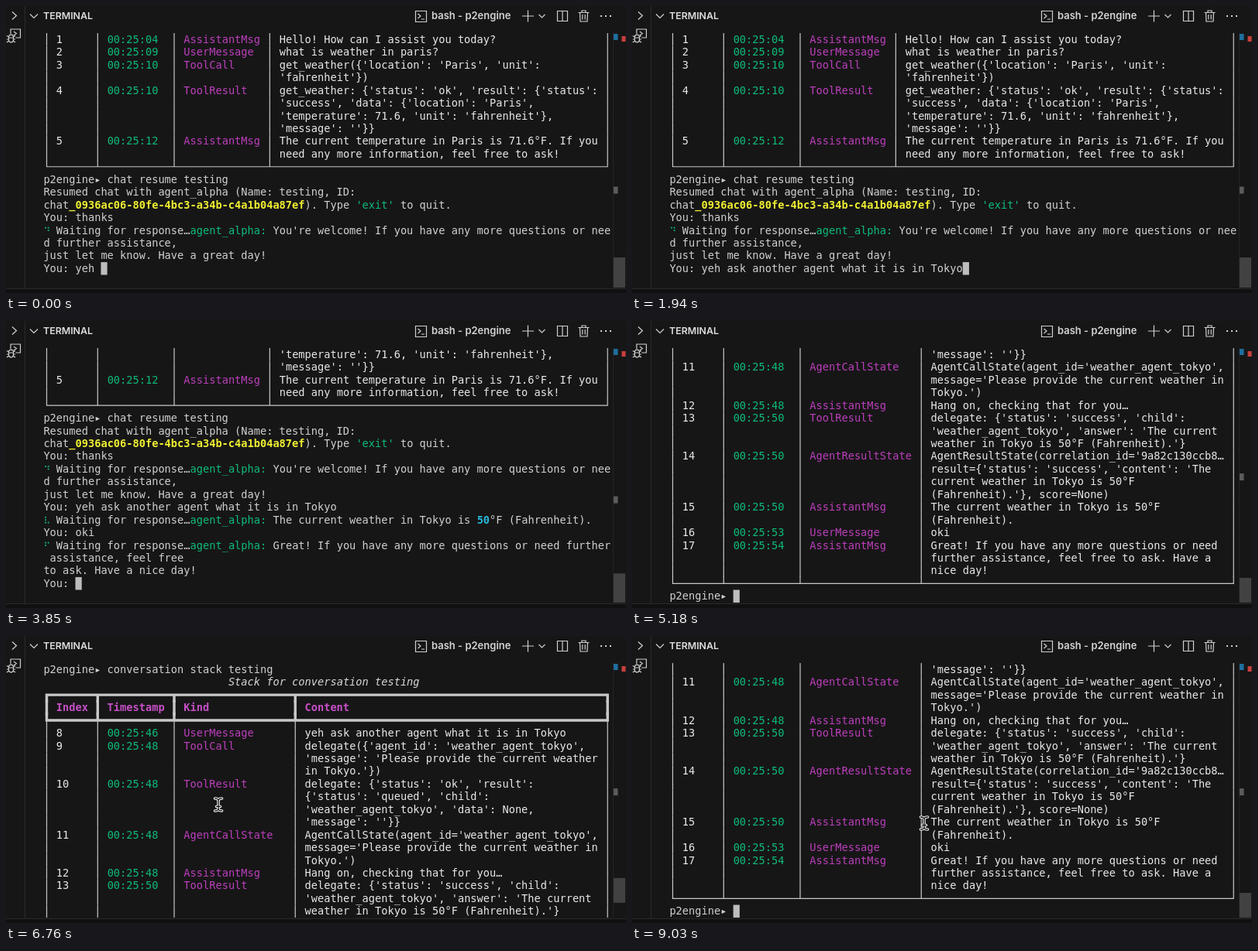
An HTML page with a canvas that plays this animation: 800 px wide and 371 px high, repeating every 9.06 s.

```html
<!DOCTYPE html>
<html lang="en">
<head>
<meta charset="utf-8">
<title>Terminal</title>
<style>
html, body { margin: 0; width: 100%; height: 100%; overflow: hidden; background: #171617; }
canvas { display: block; }
</style>
</head>
<body>
<canvas id="stage" width="800" height="371"></canvas>
<script>
const g = document.getElementById('stage').getContext('2d');
const LOOP = 9060, X0 = 48.4, TOP = 35, CW = 8.224, LH = 16.45, ROWS = 20, HISTORY = 149;
const MONO = '"DejaVu Sans Mono", monospace', SANS = 'Inter, "Open Sans", sans-serif';
const COLORS = { d: '#d0d0d0', w: '#e8e8e8', g: '#0dbc79', m: '#bc3fbc', y: '#f0f032', c: '#29b8db', h: '#c650c6', i: '#d8d8d8' };
const STYLES = { y: 'bold ', c: 'bold ', h: 'bold ', i: 'italic ' };
const SPIN = [[1, 2, 4], [1, 4, 5], [4, 5, 6], [3, 4, 5, 6], [3, 5, 6], [2, 3, 6], [1, 2, 3, 6], [1, 2, 3], [1, 2, 3, 4]];

// A tilde plus a letter switches the colour inside a line.
const PROMPT = 'p2engine▸ ';
const WAIT = '  Waiting for response…', AGENT = WAIT + '~gagent_alpha:~d ';
const BARS1 = [0, 8, 20, 35, 88], BARS2 = [0, 8, 20, 39, 88];
const text = (s, extra) => ({ s, ...extra });
const entry = (bars, id, time, kind, ...body) => body.map((b, i) => ({
  bars, s: i ? ' '.repeat(bars[3] + 2) + '~w' + b
    : '~w' + ('  ' + id).padEnd(10) + '~g00:25:' + time + '    ~m' + kind.padEnd(bars[3] - 20) + '~w' + b
}));
const first = (...a) => entry(BARS1, ...a), second = (...a) => entry(BARS2, ...a);

const intro = [
  ...first(1, '04', 'AssistantMsg', 'Hello! How can I assist you today?'),
  ...first(2, '09', 'UserMessage', 'what is weather in paris?'),
  ...first(3, '10', 'ToolCall', "get_weather({'location': 'Paris', 'unit':", "'fahrenheit'})"),
  ...first(4, '10', 'ToolResult', "get_weather: {'status': 'ok', 'result': {'status':",
    "'success', 'data': {'location': 'Paris',", "'temperature': 71.6, 'unit': 'fahrenheit'},", "'message': ''}}"),
  ...first(5, '12', 'AssistantMsg', 'The current temperature in Paris is 71.6°F. If you',
    'need any more information, feel free to ask!'),
  text('', { bars: BARS1, rule: 'end' }),
  text(PROMPT + 'chat resume testing'),
  text('Resumed chat with agent_alpha (Name: testing, ID:'),
  text("chat~y_0936ac06-80fe-4bc3-a34b-c4a1b04a87ef~d). Type ~g'exit'~d to quit."),
  text('You: thanks'),
  text(AGENT + "You're welcome! If you have any more questions or nee", { spin: 1 }),
  text('d further assistance,'),
  text('just let me know. Have a great day!')
];
const tokyo = [text(AGENT + 'The current weather in Tokyo is ~c50~d°F (Fahrenheit).', { spin: 6 })];
const great = [
  text(AGENT + 'Great! If you have any more questions or need further', { spin: 0 }),
  text(' assistance, feel free'),
  text('to ask. Have a nice day!')
];
const stack = [
  text(' '.repeat(29) + '~iStack for conversation testing'),
  text('', { bars: BARS2, rule: 'top' }),
  text('  ~hIndex   Timestamp   ' + 'Kind'.padEnd(19) + 'Content', { bars: BARS2, rule: 'head' }),
  text('', { bars: BARS2, rule: 'mid' }),
  ...second(8, '46', 'UserMessage', 'yeh ask another agent what it is in Tokyo'),
  ...second(9, '48', 'ToolCall', "delegate({'agent_id': 'weather_agent_tokyo',",
    "'message': 'Please provide the current weather", "in Tokyo.'})"),
  ...second(10, '48', 'ToolResult', "delegate: {'status': 'ok', 'result':", "{'status': 'queued', 'child':",
    "'weather_agent_tokyo', 'data': None,", "'message': ''}}"),
  ...second(11, '48', 'AgentCallState', "AgentCallState(agent_id='weather_agent_tokyo',",
    "message='Please provide the current weather in", "Tokyo.')"),
  ...second(12, '48', 'AssistantMsg', 'Hang on, checking that for you…'),
  ...second(13, '50', 'ToolResult', "delegate: {'status': 'success', 'child':",
    "'weather_agent_tokyo', 'answer': 'The current", "weather in Tokyo is 50°F (Fahrenheit).'}"),
  ...second(14, '50', 'AgentResultState', "AgentResultState(correlation_id='9a82c130ccb8…",
    "result={'status': 'success', 'content': 'The", 'current weather in Tokyo is 50°F', "(Fahrenheit).'}, score=None)"),
  ...second(15, '50', 'AssistantMsg', 'The current weather in Tokyo is 50°F', '(Fahrenheit).'),
  ...second(16, '53', 'UserMessage', 'oki'),
  ...second(17, '54', 'AssistantMsg', 'Great! If you have any more questions or need',
    'further assistance, feel free to ask. Have a', 'nice day!'),
  text('', { bars: BARS2, rule: 'end' })
];

// Linear interpolation through [time, value] points.
function along(t, keys) {
  if (t <= keys[0][0]) return keys[0][1];
  for (let i = 1; i < keys.length; i++) {
    const [a, u] = keys[i - 1], [b, v] = keys[i];
    if (t < b) return u + (v - u) * (t - a) / (b - a);
  }
  return keys[keys.length - 1][1];
}

const steps = [
  { from: 0, lead: 'You: ', say: 'yeh ask another agent what it is in Tokyo', keys: [[0, 4], [1000, 23], [1150, 23], [1900, 41]], sent: 2000, reply: 2860, out: tokyo },
  { from: 2860, lead: 'You: ', say: 'oki', keys: [[3340, 0], [3460, 3]], sent: 3520, reply: 3730, out: great },
  { from: 3730, lead: 'You: ', say: 'exit', keys: [[3930, 0], [4130, 4]], sent: 4240, reply: 4240, out: [] },
  { from: 4240, lead: PROMPT, say: 'conversation stack testing', keys: [[4290, 0], [5110, 26]], sent: 5180, reply: 5180, out: stack },
  { from: 5180, lead: PROMPT, say: '', keys: [[0, 0]], sent: LOOP + 1 }
];

function session(t) {
  const lines = [...intro];
  let cursor = true, spare = 0;
  for (const s of steps) {
    if (t < s.from) break;
    const line = s.lead + s.say.slice(0, Math.floor(along(t, s.keys)));
    lines.push(text(line));
    cursor = t < s.sent ? line.length : -1;
    spare = cursor >= 0 && s.lead !== PROMPT ? 1 : 0;
    if (t >= s.reply) lines.push(...s.out);
    else if (t >= s.sent) lines.push(text(WAIT, { spin: Math.floor((t - s.sent) / 30) % SPIN.length }));
  }
  return { lines, cursor, bottom: Math.max(0, lines.length + spare - ROWS) };
}

function rect(color, x, y, w, h) { g.fillStyle = color; g.fillRect(x, y, w, h); }

function stroke(d, color = '#d0d0d0', width = 1.2) {
  g.strokeStyle = color;
  g.lineWidth = width;
  g.stroke(new Path2D(d));
}

function label(s, x, y, font, color) {
  g.font = font;
  g.fillStyle = color;
  g.fillText(s, x, y);
}

function drawRule({ bars, rule }, y) {
  const mid = y + LH / 2, end = y + LH, xs = bars.map(c => X0 + (c + .5) * CW);
  const across = `M${xs[0]} ${mid}H${xs[4]}`;
  const down = (a, b) => xs.map(x => `M${x} ${a}V${b}`).join('');
  const thin = d => stroke(d, '#c8c8c8', 1.2), thick = d => stroke(d, '#c8c8c8', 3.4);
  g.lineCap = rule ? 'square' : 'butt';
  if (!rule) thin(down(y, end));
  if (rule === 'end') thin(across + down(y, mid));
  if (rule === 'top') thick(across + down(mid, end));
  if (rule === 'head') thick(down(y, end));
  if (rule === 'mid') { thick(across + down(y, mid)); thin(down(mid, end)); }
  g.lineCap = 'butt';
}

function drawLine(line, y) {
  if (line.bars) drawRule(line, y);
  let col = 0;
  ('~d' + line.s).split('~').slice(1).forEach(part => {
    const style = part[0], s = part.slice(1);
    label(s, X0 + col * CW, y + 12.8, (STYLES[style] || '') + '13.66px ' + MONO, COLORS[style]);
    col += s.length;
  });
  if (line.spin !== undefined) {
    for (const n of SPIN[line.spin])
      rect(COLORS.g, X0 + 1.8 + (n > 3 ? 3.6 : 0), y + 4 + (n - 1) % 3 * 3.4, 1.8, 1.8);
  }
}

function drawChrome() {
  rect('#171617', 0, 0, 800, 371);
  rect('#2b2a2b', 24, 0, 1, 365);
  rect('#2b2a2b', 0, 365, 800, 1);
  rect('#111011', 0, 366, 800, 5);
  stroke('M8 7.5L13.5 12.5L8 17.5M31 10.5L36 15.5L41 10.5');
  label('TERMINAL', 48, 17.3, '600 12.4px ' + SANS, '#dedede');
  // Debug icon in the side strip.
  stroke('M6 36V30H18.5V41H12.5M10 33L13.5 35.5L10 38M3.5 40.5A3 3.3 0 0 1 9.5 40.5V43.5A3 3.3 0 0 1 3.5 43.5ZM3.5 41H9.5M1 38.5L3.5 40M1 43H3.5M1 47L3.7 45M12 38.5L9.5 40M12 43H9.5M12 47L9.3 45');
  stroke('M528.5 6.5H542.5V20.5H528.5ZM531.5 10L535 13L531.5 16M536 17H540');
  label('bash - p2engine', 549, 17.3, '600 13px ' + SANS, '#d4d4d4');
  stroke('M666 13H681M673.5 5.5V20.5M687.5 11L691.5 15L695.5 11');
  stroke('M711.5 6.5H724.5V19.5H711.5ZM718 6.5V19.5');
  stroke('M738.5 8.5H752.5M743 8V6H748V8M740.5 8.5L741 20H750L750.5 8.5M743.8 11V17.5M747.2 11V17.5');
  for (const x of [767, 773, 779]) rect('#d0d0d0', x, 12, 2, 2);
}

function drawScrollbar(scroll, bottom) {
  const unit = ROWS * LH / (HISTORY + bottom + ROWS);
  rect('#242324', 783, TOP, 1, ROWS * LH);
  rect('#434243', 784, TOP + (HISTORY + scroll) * unit, 15, ROWS * unit);
  rect('#1f6f9f', 784, 36, 5.5, 8);
  rect('#c9403c', 794.5, 39, 5, 7);
  rect('#5c5c5c', 784, TOP + 104.3 * unit - 4.5, 5.5, 9);
}

function drawPointer(t) {
  if (t < 5500) return;
  const x = along(t, [[5500, 440], [6200, 162], [6330, 162], [6760, 274], [7000, 290], [7670, 399], [8640, 377]]);
  const y = along(t, [[5500, 310], [6200, 247], [6330, 247], [6760, 218], [7000, 205], [7670, 59], [8640, 242]]);
  const beam = 'M-4.5 -8Q0 -8 0 -5Q0 -8 4.5 -8M0 -5V5M-4.5 8Q0 8 0 5Q0 8 4.5 8M-2.5 2.5H2.5';
  g.save();
  g.translate(x, y);
  g.lineCap = 'round';
  stroke(beam, '#f2f2f2', 3.6);
  stroke(beam, '#111', 1.3);
  g.restore();
}

function draw(t) {
  const { lines, cursor, bottom } = session(t);
  const up = Math.round(along(t, [[6180, 0], [6260, 1], [6330, 1], [6720, 12], [7050, 12], [7620, 4], [7920, 4], [8400, 0]]));
  const scroll = bottom - up;
  drawChrome();
  g.save();
  g.beginPath();
  g.rect(25, TOP, 758, ROWS * LH);
  g.clip();
  lines.slice(scroll, scroll + ROWS).forEach((line, i) => drawLine(line, TOP + i * LH));
  if (cursor >= 0) rect('#bdbdbd', X0 + cursor * CW, TOP + (lines.length - 1 - scroll) * LH, CW, LH);
  g.restore();
  drawScrollbar(scroll, bottom);
  drawPointer(t);
}

const start = performance.now();
function frame() {
  draw((performance.now() - start) % LOOP);
  requestAnimationFrame(frame);
}
frame();
</script>
</body>
</html>
```
